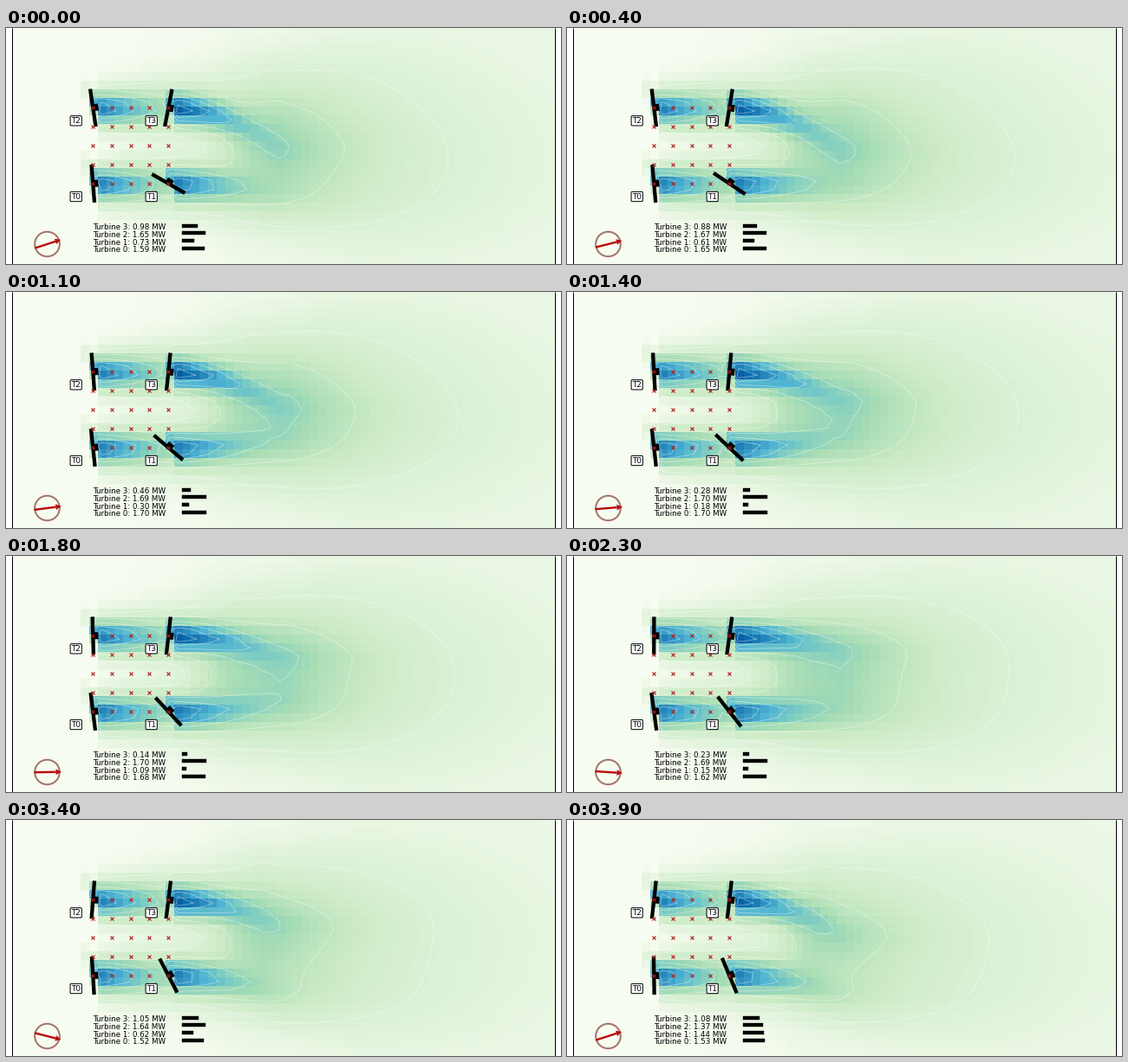
Write a matplotlib script that moves like this. It is 640 by 273 pixels and loops after 4000 ms.

```python
import numpy as np
import matplotlib.pyplot as plt
from matplotlib.animation import FuncAnimation
from matplotlib.patches import Circle, Polygon

W, H, DPI = 640, 273, 64
FRAMES, INTERVAL = 40, 100
PERIOD = 39                        # steps before the wind swings back
PT = 72 / DPI                      # points per pixel
LEFT, RIGHT = 7.5, 633.5
COLS, ROWS = 64, 27
FONT = dict(family="DejaVu Sans", size=8.8 * PT)

# Turbines T0..T3: centre, grid column, core strength and core length
XS, YS = (100.3, 187.3), (92.3, 180)
TURBINES = [(XS[0], YS[1], 9, 0.42, 70), (XS[1], YS[1], 18, 0.42, 80),
            (XS[0], YS[0], 9, 0.42, 70), (XS[1], YS[0], 18, 0.52, 95)]

cell_w, cell_h = (RIGHT - LEFT) / COLS, H / ROWS
col = np.arange(COLS)
xc = LEFT + (col + 0.5) * cell_w
yc = (np.arange(ROWS) + 0.5) * cell_h
X, Y = np.meshgrid(xc, yc)


def gauss(d, sigma):
    return np.exp(-0.5 * (d / sigma) ** 2)


def sigmoid(v):
    return 1 / (1 + np.exp(-v))


def wave(i, peak, period):
    return np.cos(2 * np.pi * (i - peak) / period)


def wind(i):
    return 18 - 36 * (i % PERIOD) / (PERIOD - 1)


def yaw(k, i):
    """Rotor heading in degrees."""
    return (np.interp(i, [0, 25, 39], [4.5, 8, 1]),
            60 - 0.96 * i,
            8.5 - 0.38 * i,
            np.interp(i, [0, 13, 24, 39], [-11, -5, -8, -6.5]))[k]


def power(k, i):
    """Output in MW; the downwind pair loses most when the rows line up."""
    free = 1.7 * np.cos(np.radians(yaw(k, i) - wind(i))) ** 2.3
    loss = (0, 0.9 * gauss(wind(i), 9.5), 0, 0.92 * gauss(wind(i), 10.5))[k]
    return free * (1 - loss)


def bend(k, i):
    """Sideways drift of a wake, in pixels per (100 px)^2."""
    return (0, 2 - 10 * wave(i, 14, 46), 0, 19 + 10 * wave(i, 4, 42))[k]


def wake(k, i):
    """Speed deficit behind turbine k: a dark core in a spreading halo."""
    x0, y0, c0, strength, length = TURBINES[k]
    s = np.maximum(X - x0, 0)
    dy = Y - y0 - 1 - bend(k, i) * np.minimum(s / 100, 1.3) ** 2
    stretch = 1.12 - 0.012 * abs(wind(i))
    core = strength * np.exp(-(s / (length * stretch)) ** 1.5) * gauss(dy, 11)
    halo = 0.42 * np.exp(-s / 220) * gauss(dy, 17 + 0.12 * s)
    d = core + halo
    d[:, col < c0] = 0
    d[:, c0] = 0.64 * gauss(yc - y0 + 7, 9)
    d[:, c0 - 1] = 0.12 * gauss(yc - y0 + 22, 8)
    return d


def plume(i):
    """Merged, slowly fading wake of the whole farm."""
    reach = 14 - 0.06 * (i - 13) ** 2
    far = np.maximum(X - 310 - reach, 0)
    start = sigmoid((X - 218 - 1.7 * abs(wind(i))) / 20)
    sigma = 60 + 0.22 * np.maximum(X - 320, 0)
    haze = 0.035 * sigmoid((X - 280) / 60)
    return 0.38 * start * np.exp(-far / 150) * gauss(Y - 136, sigma) + haze


def field(i):
    parts = [wake(k, i) for k in range(4)] + [plume(i)]
    return np.cbrt(sum(p ** 3 for p in parts))


fig = plt.figure(figsize=(W / DPI, H / DPI), dpi=DPI, facecolor="white")
ax = fig.add_axes([0, 0, 1, 1])
ax.axis("off")

image = ax.imshow(field(0), cmap="GnBu", vmin=0, vmax=1, aspect="auto",
                  interpolation="nearest", extent=(LEFT, RIGHT, H, 0))
ax.set_xlim(0, W)
ax.set_ylim(H, 0)


def stroke(width, color="black", z=4, cap="butt"):
    return ax.plot([], [], color=color, lw=width * PT, zorder=z,
                   solid_capstyle=cap)[0]


def set_segment(line, a, b):
    line.set_data([a[0], b[0]], [a[1], b[1]])


for x in (7, 633):
    set_segment(stroke(1, z=3), (x, 0), (x, H))

rotors = [stroke(4.3) for _ in TURBINES]
nacelles = [stroke(8) for _ in TURBINES]
bars = [stroke(4.4, cap="projecting") for _ in TURBINES]
labels = []
for k, (x, y, *_) in enumerate(TURBINES):
    ax.text(x - 19.6, y + 15, f"T{k}", ha="center", va="center", zorder=6,
            bbox=dict(boxstyle="round,pad=0.13", fc="white", ec="black",
                      lw=PT), **FONT)
    labels.append(ax.text(100.3, 233.4 + 8.65 * (3 - k), "", zorder=6,
                          va="baseline", **FONT))

gx, gy = np.meshgrid(np.linspace(100, 187, 5), np.linspace(92, 180, 5))
ax.plot(gx.ravel(), gy.ravel(), "x", color="#b01c1c", ms=4.2 * PT,
        mew=1.1 * PT, zorder=5)

HUB = np.array([47.5, 250])
ax.add_patch(Circle(HUB, 14.3, fill=False, ec="#a5736a", lw=2 * PT, zorder=4))
shaft = stroke(2.4, "#b80c0c", z=5)
head = ax.add_patch(Polygon(np.zeros((3, 2)), fc="#b80c0c", ec="none",
                            zorder=5))
contours = []


def axes_of(deg):
    """Unit vectors along and across a heading, y pointing down."""
    a = np.radians(deg)
    return (np.array([np.cos(a), -np.sin(a)]),
            np.array([np.sin(a), np.cos(a)]))


def draw(i):
    d = field(i)
    image.set_data(d)
    while contours:
        contours.pop().remove()
    contours.append(ax.contour(xc, yc, d, levels=np.arange(0.16, 0.95, 0.13),
                               colors="white", alpha=0.45,
                               linewidths=0.8 * PT, zorder=2))

    for k, (x, y, *_) in enumerate(TURBINES):
        centre = np.array([x, y])
        along, across = axes_of(yaw(k, i))
        set_segment(rotors[k], centre - 22 * across, centre + 22 * across)
        set_segment(nacelles[k], centre, centre + 6 * along)
        mw = power(k, i)
        labels[k].set_text(f"Turbine {k}: {mw:.2f} MW")
        row = 228.8 + 8.65 * (3 - k)
        set_segment(bars[k], (205, row), (205 + 14 * mw, row))

    along, across = axes_of(wind(i))
    neck = HUB + 10 * along
    set_segment(shaft, HUB - 15 * along, neck)
    head.set_xy([neck - 3.3 * across, HUB + 16.5 * along, neck + 3.3 * across])
    return []


anim = FuncAnimation(fig, draw, frames=FRAMES, interval=INTERVAL,
                     repeat=True, repeat_delay=0, blit=False)
plt.show()
```
